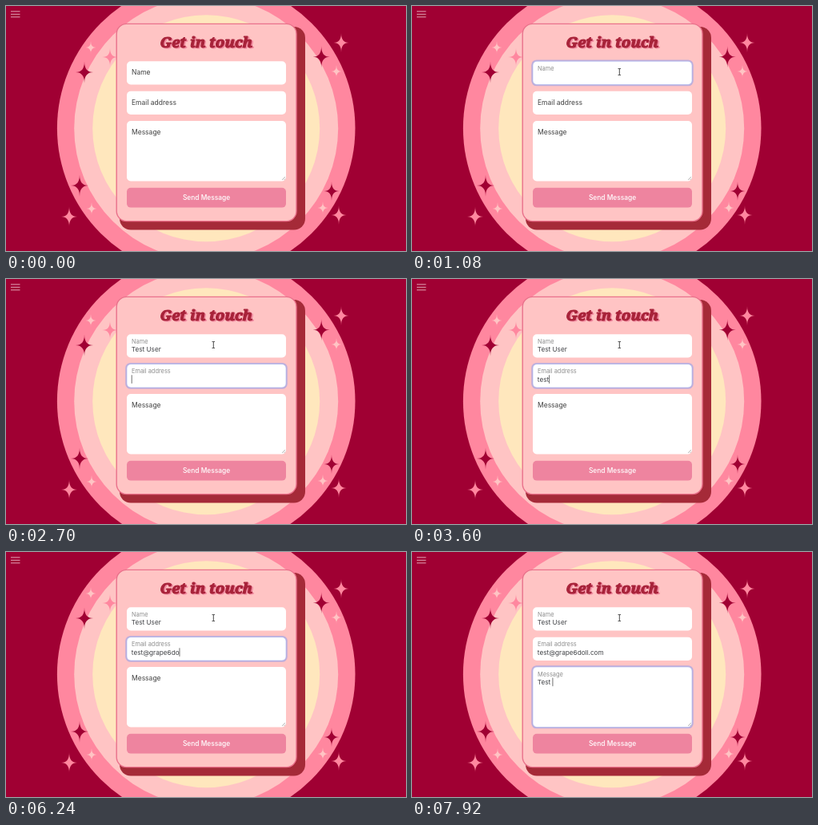
An HTML page with a canvas for the animation above (8 s loop, 500x307 px).

```html
<!DOCTYPE html>
<html lang="en">
<head>
<meta charset="utf-8">
<title>Get in touch</title>
<style>
  html, body { margin: 0; width: 100%; height: 100%; overflow: hidden; background: #a00033; }
  canvas { display: block; width: 500px; height: 307px; }
</style>
</head>
<body>
<canvas id="stage"></canvas>
<script>
const W = 500, H = 307, LOOP = 8000, BLINK = 520;
const SANS = 'Inter, "Open Sans", sans-serif';
const WINE = '#a00033', ROSE = '#ff879f', BLUSH = '#ffc4c4', CREAM = '#ffe7bd';

const canvas = document.getElementById('stage');
const ctx = canvas.getContext('2d');
const dpr = window.devicePixelRatio || 1;
canvas.width = Math.round(W * dpr);
canvas.height = Math.round(H * dpr);

// x, y, half width, half height, colour
const stars = [
  [98, 83, 11, 13.5, WINE], [106, 52, 6.5, 8, BLUSH], [130, 64, 9.5, 11.5, ROSE],
  [92, 225, 11, 13.5, WINE], [107, 254, 6.5, 8, BLUSH], [79, 264, 10, 12.5, ROSE],
  [419, 46, 9.5, 12, ROSE], [394.2, 63.7, 10.5, 13.5, WINE], [413, 82, 6.5, 8, BLUSH],
  [407, 232, 9.5, 12, WINE], [396, 253, 6.5, 8, BLUSH], [416, 262, 9.5, 12, ROSE]
];

// keys: the time each character of the text is typed
const fields = [
  { label: 'Name', y: 69.2, h: 29.3, focus: 560, blur: 2540, text: 'Test User',
    keys: [1260, 1440, 1560, 1560, 1680, 2100, 2280, 2340, 2400] },
  { label: 'Email address', y: 106.7, h: 29.3, focus: 2540, blur: 7060, text: 'test@grape6doll.com',
    keys: [3360, 3420, 3540, 3600, 3840, 4620, 4860, 5160, 5580, 5640, 5820,
           6060, 6240, 6360, 6480, 6660, 6720, 6840, 6900] },
  { label: 'Message', y: 144, h: 75.5, focus: 7060, blur: Infinity, text: 'Test ',
    keys: [7560, 7620, 7740, 7800, 7920] }
];

const clamp = v => Math.max(0, Math.min(1, v));
const mix = (a, b, p) => a + (b - a) * p;
const smooth = p => p * p * (3 - 2 * p);
const ramp = (t, start, length) => smooth(clamp((t - start) / length));

function circle(r, color) {
  ctx.fillStyle = color;
  ctx.beginPath();
  ctx.arc(250.2, 153.2, r, 0, Math.PI * 2);
  ctx.fill();
}

function box(x, y, w, h, r, fill, stroke, lineWidth) {
  ctx.beginPath();
  ctx.roundRect(x, y, w, h, r);
  if (fill) { ctx.fillStyle = fill; ctx.fill(); }
  if (stroke) { ctx.strokeStyle = stroke; ctx.lineWidth = lineWidth; ctx.stroke(); }
}

function line(color, width, ...points) {
  ctx.strokeStyle = color;
  ctx.lineWidth = width;
  ctx.beginPath();
  for (let i = 0; i < points.length; i += 4) {
    ctx.moveTo(points[i], points[i + 1]);
    ctx.lineTo(points[i + 2], points[i + 3]);
  }
  ctx.stroke();
}

function write(text, x, y, font, color, align = 'left') {
  ctx.font = font;
  ctx.fillStyle = color;
  ctx.textAlign = align;
  ctx.fillText(text, x, y);
}

function star([x, y, a, b, color]) {
  ctx.fillStyle = color;
  ctx.beginPath();
  ctx.moveTo(x, y - b);
  ctx.quadraticCurveTo(x, y, x + a, y);
  ctx.quadraticCurveTo(x, y, x, y + b);
  ctx.quadraticCurveTo(x, y, x - a, y);
  ctx.quadraticCurveTo(x, y, x, y - b);
  ctx.fill();
}

function drawBackdrop() {
  ctx.fillStyle = WINE;
  ctx.fillRect(0, 0, W, H);
  circle(186.3, ROSE);
  circle(165, BLUSH);
  circle(142, CREAM);
  stars.forEach(star);
  line('#dfa3b3', 1, 6, 6.8, 17.5, 6.8, 6, 10.3, 17.5, 10.3, 6, 13.8, 17.5, 13.8);
}

function drawCard() {
  box(142, 26, 232, 254.5, 14, '#a52a38');
  box(138.2, 22.4, 224.8, 247.2, 12.5, BLUSH, '#e9718b', 1.4);

  const font = 'italic 900 18.7px "Noto Serif", serif';
  const title = 'Get in touch';
  ctx.lineJoin = 'round';
  for (const [d, color] of [[1.7, '#f08aa0'], [0, '#a8233a']]) {
    write(title, 250.3 + d, 51.7 + d, font, color, 'center');
    ctx.strokeStyle = color;
    ctx.lineWidth = 1.2;
    ctx.strokeText(title, 250.3 + d, 51.7 + d);
  }

  box(151, 227.8, 199, 24.8, 5, '#ee849f');
  write('Send Message', 250.5, 243, `500 8.4px ${SANS}`, '#fff', 'center');
}

function drawField(f, t) {
  const { y, h } = f;
  const ring = ramp(t, f.focus, 170) * (1 - ramp(t, f.blur, 90));
  const lift = ramp(t, f.focus, 100);

  if (ring > 0) {
    ctx.globalAlpha = ring;
    box(149.2, y - 1.8, 202.6, h + 3.6, 6.5, '#c0aeda');
    ctx.globalAlpha = 1;
  }
  box(151, y, 199, h, 5, '#fff');
  if (ring > 0) {
    ctx.globalAlpha = ring;
    box(151, y, 199, h, 5, null, '#a6b4ef', 0.6);
    ctx.globalAlpha = 1;
  }

  const shade = Math.round(mix(64, 142, lift));
  write(f.label, 157, y + mix(17.2, 11.6, lift), `${mix(8.5, 7.4, lift)}px ${SANS}`,
    `rgb(${shade},${shade},${shade})`);

  const count = f.keys.filter(k => k <= t).length;
  const typed = f.text.slice(0, count);
  write(typed, 156.8, y + 22, `8.2px ${SANS}`, '#404246');

  if (t >= f.focus && t < f.blur) {
    const lastAction = count ? f.keys[count - 1] : f.focus;
    if ((t - lastAction) % (2 * BLINK) < BLINK) {
      const x = 157.2 + ctx.measureText(typed).width;
      line('#333', 0.7, x, y + 13.6, x, y + 24.2);
    }
  }
}

function drawResizeGrip() {
  line('#888', 0.6, 345, 218, 349, 214, 347.4, 218, 349, 216.4);
}

function drawPointer(t) {
  if (t < 120) return;
  const p = ramp(t, 90, 450);
  const x = mix(413, 259.3, p), y = mix(252, 82.5, p);
  const overField = x > 151 && x < 350 && fields.some(f => y > f.y && y < f.y + f.h);
  if (overField) {
    line('#333', 0.9, x, y - 3.6, x, y + 3.6);
    line('#333', 0.8, x - 1.8, y - 4, x + 1.8, y - 4, x - 1.8, y + 4, x + 1.8, y + 4);
    return;
  }
  const arrow = [[0, 0], [0, 8.6], [2, 6.8], [3.4, 9.8], [4.7, 9.2], [3.4, 6.3], [6, 6.2]];
  ctx.beginPath();
  arrow.forEach(([dx, dy]) => ctx.lineTo(x + dx, y + dy));
  ctx.closePath();
  ctx.fillStyle = '#111';
  ctx.fill();
  ctx.strokeStyle = '#fff';
  ctx.lineWidth = 0.7;
  ctx.stroke();
}

function render(now) {
  const t = now % LOOP;
  ctx.setTransform(dpr, 0, 0, dpr, 0, 0);
  drawBackdrop();
  drawCard();
  fields.forEach(f => drawField(f, t));
  drawResizeGrip();
  drawPointer(t);
}

const start = performance.now();
function tick() {
  render(performance.now() - start);
  requestAnimationFrame(tick);
}
tick();
</script>
</body>
</html>
```
